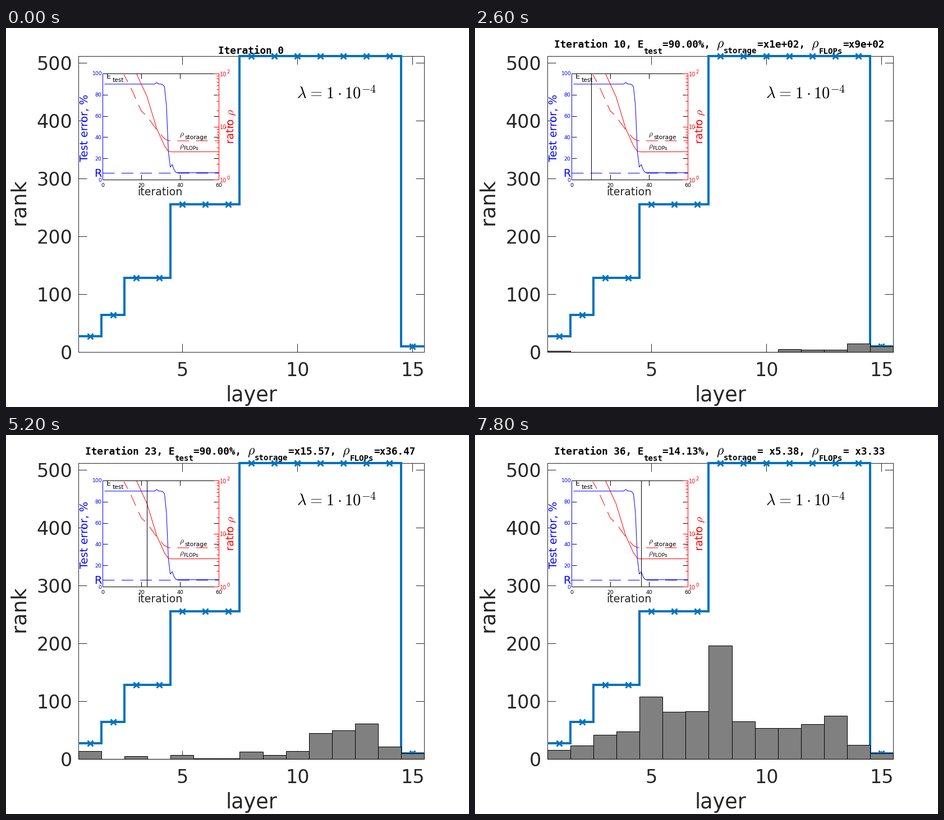
Animation of 825 by 675 pixels, one loop 8000 ms. Source, as a matplotlib script:

```python
import numpy as np
import matplotlib.pyplot as plt
from matplotlib.animation import FuncAnimation
from matplotlib.patches import PathPatch, Rectangle
from matplotlib.textpath import TextPath
from matplotlib.transforms import Affine2D

plt.rcParams["font.family"] = "DejaVu Sans"
plt.rcParams["mathtext.fontset"] = "cm"

W, H, DPI = 825, 675, 100
PX = 72 / DPI  # points per pixel
INK, LINE_BLUE = "#262626", "#0072BD"
BLUE, RED = "#0000ff", "#ff0000"

FULL_RANKS = [27, 64, 128, 128] + [256] * 3 + [512] * 7 + [10]

# Each layer but the last grows along a logistic: final rank and midpoint.
FINAL = np.array([16, 24, 43, 55, 110, 88, 90, 200, 66, 53, 53, 60, 75, 25])
MIDPOINT = np.array([16.6, 30.3, 27.2, 32.8, 28.4, 31.5, 31.5, 28.3, 27.3,
                     25.3, 17.5, 18, 18.7, 5])

# Compression ratios at a few iterations, log-linear in between.
RATIO_AT = [1, 5, 11, 14, 20, 23, 28, 32, 34, 36, 60]
STORAGE = [1000, 500, 95, 60.32, 19.7, 15.57, 8.67, 5.91, 5.42, 5.38, 5.4]
FLOPS = [2e4, 9e3, 600, 190, 63, 36.47, 9.11, 4.33, 3.4, 3.33, 3.36]


def logistic(u):
    return 1 / (1 + np.exp(-u))


def bump(t, center, height, width):
    return height * np.exp(-((t - center) / width) ** 2)


def ranks_at(t):
    grown = FINAL * logistic((t - MIDPOINT) * MIDPOINT / 56)
    return np.append(np.round(grown), FULL_RANKS[-1])


def test_error(t):
    drop = 6.5 + 83.5 * logistic(2.3053 * (33.5 - t))
    return drop + bump(t, 28, 1.49, 0.6) + bump(t, 36, 7.3685, 1)


def ratio(values, t):
    return np.exp(np.interp(t, RATIO_AT, np.log(values)))


# Pixel positions of the main plot and of the inset.
L, R, T, B = 129, 745, 50, 577
IL, IR, IT, IB = 172, 379, 81, 270


def layer_x(layer):
    return L + (np.asarray(layer) - 0.5) * (R - L) / 15


def rank_y(rank):
    return B - np.asarray(rank) * (B - T) / 512


def iter_x(t):
    return IL + np.asarray(t) * (IR - IL) / 60


def error_y(e):
    return IB - np.asarray(e) * (IB - IT) / 100


def ratio_y(r):
    return IB - np.log10(r) * (IB - IT) / 2


fig = plt.figure(figsize=(W / DPI, H / DPI), dpi=DPI, facecolor="white")
ax = fig.add_axes([0, 0, 1, 1])
ax.set(xlim=(0, W), ylim=(H, 0))
ax.axis("off")


def line(x, y, color=INK, width=1, **kw):
    kw.setdefault("solid_capstyle", "butt")
    return ax.plot(x, y, color=color, lw=width * PX, **kw)[0]


def label(x, y, s, size, color=INK, ha="left", **kw):
    return ax.text(x, y, s, fontsize=size * PX, color=color, ha=ha,
                   va="baseline", zorder=8, **kw)


def vlabel(x, y, s, size, color=INK):
    """Text that reads upwards, its baseline at x and its start at y."""
    turn = Affine2D([[0, -1, x], [-1, 0, y], [0, 0, 1]])
    path = TextPath((0, 0), s, size=size, prop={"family": "DejaVu Sans"})
    ax.add_patch(PathPatch(turn.transform_path(path), fc=color, ec="none",
                           zorder=8))


# Main axes
line([L, R, R, L, L], [T, T, B, B, T], zorder=1, solid_joinstyle="miter")
for layer in (5, 10, 15):
    x = layer_x(layer)
    line([x, x], [B, B - 15], zorder=1)
    line([x, x], [T, T + 15], zorder=1)
    label(x, 619.5, str(layer), 33.33, ha="center")
for rank in range(0, 501, 100):
    y = rank_y(rank)
    line([L, L + 15], [y, y], zorder=1)
    line([R - 15, R], [y, y], zorder=1)
    label(118, y + 12.5, str(rank), 33.33, ha="right")
label(437.5, 665, "layer", 36.67, ha="center")
vlabel(36, 355, "rank", 36.67)
label(517.8, 126, r"$\lambda\hspace{0.08}=\hspace{0.08}1\hspace{0.02}"
      r"\cdot\hspace{0.02}10^{-4}$", 28.4, "black")

edges = np.arange(0.5, 16)
line(np.repeat(layer_x(edges), 2)[1:-1], np.repeat(rank_y(FULL_RANKS), 2),
     LINE_BLUE, 4, zorder=2, solid_joinstyle="miter")
line(layer_x(np.arange(1, 16)), rank_y(FULL_RANKS), LINE_BLUE, 1, ls="none",
     marker="x", ms=10 * PX, mew=3 * PX, zorder=2)

bars = [ax.add_patch(Rectangle((x, B), (R - L) / 15, 0, fc="#808080",
                               ec="black", lw=PX, zorder=3))
        for x in layer_x(edges[:-1])]

# Inset axes
ax.add_patch(Rectangle((IL, IT), IR - IL, IB - IT, fc="white", ec="none",
                       zorder=4))
line([IL, IR], [IT, IT], "black", zorder=6)
line([IL, IR], [IB, IB], "black", zorder=6)
line([IL, IL], [IT, IB], BLUE, zorder=6)
line([IR, IR], [IT, IB], RED, zorder=6)
for t in range(0, 61, 20):
    x = iter_x(t)
    if 0 < t < 60:
        line([x, x], [IB, IB - 9], "black", zorder=5)
        line([x, x], [IT, IT + 9], "black", zorder=5)
    label(x + 0.5, 283.3, str(t), 9.4, "black", ha="center")
for e in range(0, 101, 20):
    y = error_y(e)
    if 0 < e < 100:
        line([IL, IL + 9], [y, y], "#000080", zorder=5)
        line([IR - 9, IR], [y, y], "black", zorder=5)
    label(170.5, y + 3.5, str(e), 9.4, BLUE, ha="right")
for power in range(3):
    y = ratio_y(10.0 ** power)
    line([IR - 9, IR], [y, y], RED, zorder=6)
    label(380.5, y + 5, "10", 9.6, RED)
    label(393.3, y, str(power), 8.5, RED)
    if power < 2:
        for k in range(2, 10):
            y = ratio_y(k * 10.0 ** power)
            line([IR - 4, IR], [y, y], RED, zorder=6)
label(234.6, 298, "iteration", 19)
vlabel(145, 238.5, "Test error, %", 19, BLUE)
vlabel(405, 206.5, r"ratio ", 19, RED)
vlabel(405, 156.5, r"$\rho$", 20, RED)
label(156.8, 265, "R", 19, BLUE)
label(178.5, 90.5, "E", 13, "black")
label(189.8, 96, "test", 10.5, "black")
label(309, 193, r"$\rho$", 13, "black")
label(318.5, 198, "storage", 10.5, "black")
label(309, 214, r"$\rho$", 13, "black")
label(316.5, 217, "FLOPs", 9, "black")

# Inset curves
clip = Rectangle((IL, IT), IR - IL, IB - IT, transform=ax.transData)


def curve(t, y, color, dash_offset=None):
    c = line(iter_x(t), y, color, zorder=5)
    if dash_offset is not None:
        c.set_dash_capstyle("butt")
        c.set_linestyle((dash_offset, (21, 12.3)))
    c.set_clip_path(clip)


iterations = np.arange(1, 61)
visible = iterations[10:]
curve(iterations, error_y(test_error(iterations)), BLUE)
curve(iterations, ratio_y(ratio(FLOPS, iterations)), RED)
curve(visible, ratio_y(ratio(STORAGE, visible)), RED, 6.5)
curve([0, 60], error_y([6.4, 6.4]), BLUE, 0)
cursor = line([IL, IL], [IT, IB], "black", zorder=7)

# Title, built from pieces that keep their places
MONO = 17.72


def mono(x, y, s="", scale=1.0):
    return label(x, y, s, MONO * scale, "black", family="DejaVu Sans Mono",
                 weight="bold")


start = mono(378.5, 46, "Iteration 0")
head = mono(141, 35)
error_text = mono(334.5, 35)
storage_text = mono(502.7, 35)
flops_text = mono(655.5, 35)
fixed = [mono(300.5, 45.5, "test", 0.8), mono(443, 45.5, "storage", 0.8),
         mono(612.8, 45.5, "FLOPs", 0.8),
         label(430.5, 35, r"$\rho$", 24, "black"),
         label(599, 35, r"$\rho$", 24, "black")]
running_items = fixed + bars + [head, error_text, storage_text, flops_text,
                                cursor]


def ratio_label(r):
    return ("x%.0e" % r if r >= 100 else "x%.2f" % r).rjust(6)


def update(frame):
    t = max(0, frame - 3)
    running = t > 0
    start.set_visible(not running)
    for item in running_items:
        item.set_visible(running)
    if running:
        head.set_text(f"Iteration {t:2d}, E")
        error_text.set_text(f"={test_error(t):.2f}%, ")
        storage_text.set_text(f"={ratio_label(ratio(STORAGE, t))}, ")
        flops_text.set_text(f"={ratio_label(ratio(FLOPS, t))}")
        cursor.set_xdata([iter_x(t)] * 2)
        for bar, rank in zip(bars, ranks_at(t)):
            bar.set_height(rank_y(rank) - B)
    return []


anim = FuncAnimation(fig, update, frames=40, interval=200, repeat=True,
                     repeat_delay=0, blit=False)
plt.show()
```
